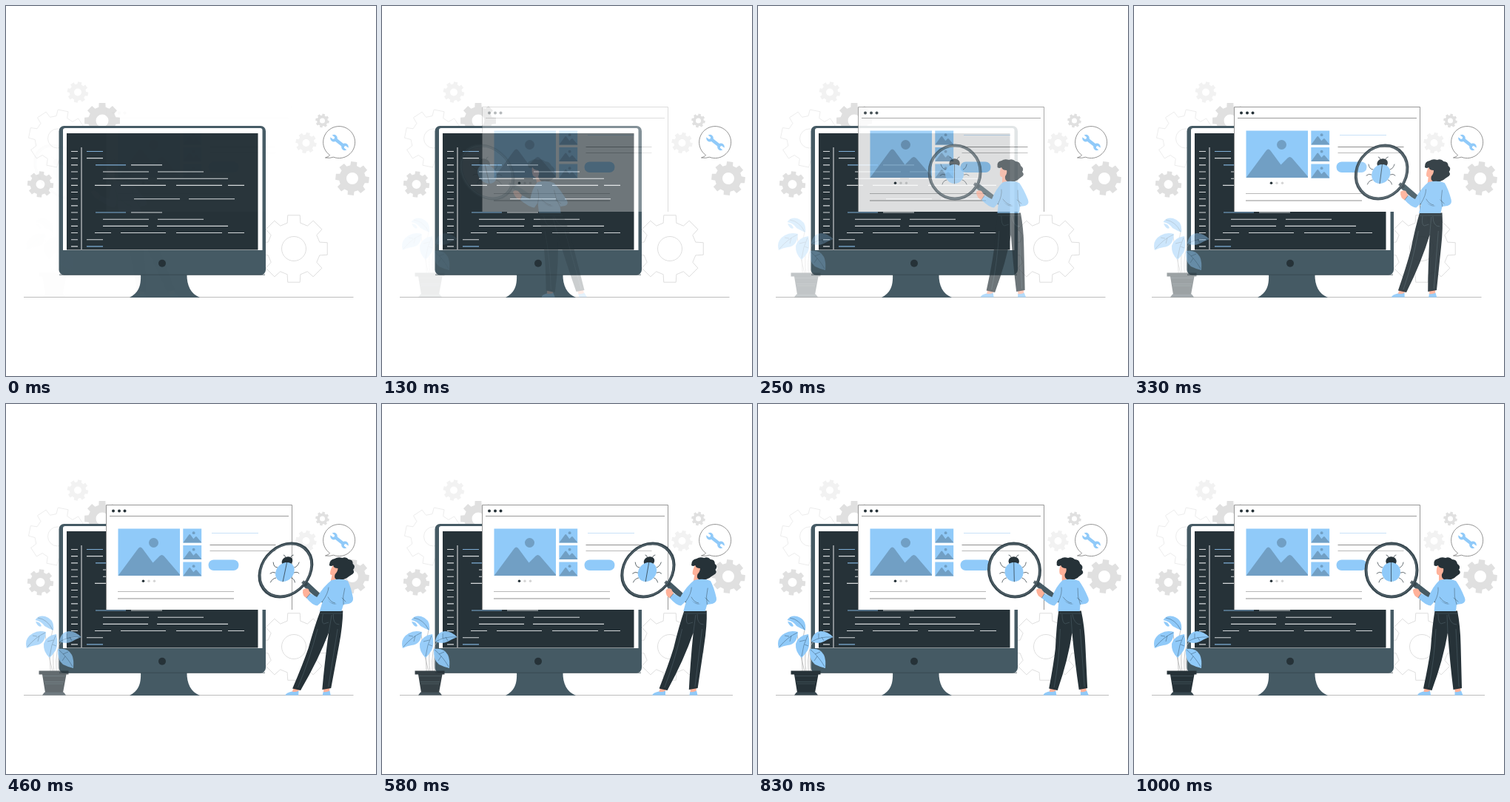
Write an HTML page that moves like this. It is 500 px wide and 500 px high and loops after 1.04 s.

```html
<!DOCTYPE html>
<html>
<head>
<meta charset="utf-8">
<style>
  html, body { margin: 0; width: 100%; height: 100%; overflow: hidden; background: #fff; }
  svg { display: block; width: 100vw; height: 100vh; }
  .blue { fill: #90caf9; }
  .dark { fill: #263238; }
  .slate { fill: #455a64; }
  .skin { fill: #ffb199; }
  .line { fill: none; stroke: #263238; stroke-width: .7; stroke-linecap: round; stroke-linejoin: round; }
  .vein { fill: none; stroke: #456b88; stroke-width: .6; }
  .fold { fill: none; stroke: #53666e; stroke-width: .5; }
</style>
</head>
<body>
<svg viewBox="0 0 500 500">
  <defs>
    <g id="photo">
      <path class="blue" d="M0 0H83.5V63.5H0Z"/>
      <path fill="#719fc4" d="M0 63.5L27 27Q30 23 33 27L47 46L56 37Q59 34 62 37L83.5 62V63.5Z"/>
      <circle cx="48" cy="19" r="6.5" fill="#719fc4"/>
    </g>
  </defs>

  <g id="gears"></g>
  <path id="floor" fill="none" stroke="#bdbdbd"/>

  <g id="bubble">
    <path d="M437.5 201.5Q436 204 431.5 205Q438 206 442.5 204.2A21.5 21.5 0 1 0 437.5 201.5Z" fill="#fff" stroke="#777" stroke-width=".8"/>
    <g transform="translate(450.5 184.5) rotate(38)">
      <path class="blue" d="M-8 -2.2H8V2.2H-8Z"/>
      <circle class="blue" cx="-9.5" r="4.8"/>
      <circle class="blue" cx="9.5" r="4.8"/>
      <path fill="#fff" d="M-15 -1.8H-9.5L-8.5 0L-9.5 1.8H-15ZM15 -1.8H9.5L8.5 0L9.5 1.8H15Z"/>
    </g>
  </g>

  <g id="monitor">
    <path class="slate" d="M182 362C183 380 178 388 167 394H262C250 389 244 378 244.500 362Z"/>
    <rect class="slate" x="71.500" y="162" width="279.500" height="201.500" rx="7"/>
    <path fill="#fff" d="M77 330V168Q77 165 80 165H343.500Q346.500 165 346.500 168V330Z"/>
    <path class="dark" d="M82 172H340.500V329.500H82Z"/>
    <path stroke="#37474f" stroke-width=".8" d="M72 363.200H350"/>
    <circle class="dark" cx="211" cy="347.800" r="5"/>
    <path id="code" fill="none" stroke="#d5d9db" stroke-width="1.100"/>
    <path id="keywords" fill="none" stroke="#7faed6" stroke-width="1.100"/>
  </g>

  <g id="page">
    <path fill="#fff" d="M135.500 136.500H386.500V278H135.500Z"/>
    <path fill="none" stroke="#8c8c8c" stroke-width=".9" d="M135.500 278V136.500H386.500V278"/>
    <path stroke="#9a9a9a" d="M140 151.500H382"/>
    <g class="dark">
      <circle cx="145" cy="144.400" r="2"/>
      <circle cx="153" cy="144.400" r="2"/>
      <circle cx="160.500" cy="144.400" r="2"/>
      <circle cx="185.500" cy="239.300" r="1.800"/>
    </g>
    <circle cx="193" cy="239.300" r="1.700" fill="#d5d5d5"/>
    <circle cx="200.500" cy="239.300" r="1.700" fill="#d5d5d5"/>
    <use href="#photo" x="151.500" y="168.500"/>
    <g id="thumbs"></g>
    <path stroke="#c9e2f8" d="M278 174.500H341"/>
    <path stroke="#8f8f8f" d="M275.500 190.500H364.500M151 263H308"/>
    <path stroke="#b8b8b8" d="M275.500 198.500H364.500M151 253.500H308"/>
    <rect class="blue" x="273.500" y="210.500" width="41" height="14.500" rx="7.200"/>
  </g>

  <g id="plant">
    <path fill="none" stroke="#b5b5b5" stroke-width=".8" d="M60 361Q58 325 63 305M63 361Q56 338 53 312M65 361Q62 348 66 316M68 361Q66 330 76 319M71 361Q69 346 72 333"/>
    <g class="blue">
      <path d="M39.500 292Q44 285 53 287Q66 291 64 306Q57 303 52 300Q47 293 39.500 292Z"/>
      <path d="M40 294Q46 294 48 300Q44 303 40 294Z"/>
      <path d="M54 308Q53 325 40 326Q33 327 28 330Q24 317 36 310Q44 305 54 308Z"/>
      <path d="M68 311Q71 325 67 333Q63 339 59 343Q50 335 51 324Q54 313 68 311Z"/>
      <path d="M72 321Q74 308 85 307Q94 307 101.500 315Q94 318 89 321Q81 325 72 321Z"/>
      <path d="M70 331Q84 329 89 339Q92 345 91 357Q83 355 77 352Q69 346 70 331Z"/>
    </g>
    <path class="vein" d="M43 289Q56 291 63 305M53 309Q40 315 29 328M42 314L36 313M45 313L43 321M67 313Q61 325 59 341M64 319L56 321M63 325L68 327M73 321Q84 314 100 315M82 317L82 310M86 315L89 320M71 332Q82 341 90 355M77 338L84 335M80 341L76 347"/>
    <path class="dark" d="M44.500 360.500H84.500V365.500H81.500L77 390H53L49 365.500H44.500Z"/>
    <path fill="#37474f" d="M52 389.500H78L81 393.500H49Z"/>
    <path class="fold" d="M50 367.500H80M52 375.500H78M53 378H77"/>
  </g>

  <g id="woman">
    <g id="shoes">
      <path fill="#ffb199" d="M393 383H401L399 390H391ZM433 383H441L442 390H434Z"/>
      <path class="blue" d="M383 393.500Q384 390 391 388.500Q396 390 400 387.500L401 393.500ZM433.500 393.500V389Q438 390 442 387.500L444.500 393.500Z"/>
    </g>
    <path class="dark" d="M406.500 279.500H437Q441 300 441.500 325L443 384L431.500 386Q427 350 424 309Q418 345 402.500 387L391 384.500Q398 352 401 330Q403 300 406.500 279.500Z"/>
    <path class="fold" d="M406.500 283H437.500M411 284Q411 296 415 297L421 295M425 284Q427 298 436 298M424 309L423 285M408 304Q406 345 398 383M435 304Q437 345 439 382"/>
    <path class="skin" d="M412 230L422 229L424 240H412Z"/>
    <path class="skin" d="M411 217Q408 223 409 229Q410 232 415 231L421 229L420 216Z"/>
    <path class="dark" d="M405.500 218Q404 210 411 209Q415 206 421 208Q426 206 430 210Q436 210 437 216Q442 219 439 224Q443 228 438 231Q435 233 433 235Q427 239 419 237Q415 235 416 230Q419 226 418 222Q412 222 411 218Q408 220 405.500 218Z"/>
    <path class="slate" d="M380 239.500L409.500 262.500Q411.500 267 406.500 268.500L376 246Z"/>
    <path class="skin" d="M377 251Q380 248 384 250L388 256L386 263Q377 260 377 251Z"/>
    <path class="blue" d="M413 238Q425 235 435 239Q441 247 447 262Q449 268 443 270L436 271L435 280H405.500L407 266L401 272.500Q394 272 384 262L388 256L398 261Q404 246 413 238Z"/>
    <path class="line" stroke-opacity=".55" d="M407 266Q412 256 411 248M436 271Q432 260 433 249M424 269Q418 268 413 261M438 267L432 262M388 256L384 262"/>
    <path fill="#719fc4" d="M412 262Q417 270 427 270Q419 273 412 262Z"/>
    <path stroke="#37474f" stroke-width="4" d="M374 240L381 245"/>
    <ellipse cx="348" cy="224.500" rx="34.500" ry="36" fill="#fff" fill-opacity=".18" stroke="#37474f" stroke-width="4"/>
    <ellipse cx="348" cy="224.500" rx="34" ry="35.500" fill="none" stroke="#75858d" stroke-width=".6"/>
    <g id="bug">
      <path class="line" d="M336 221Q331 221 329 214M359 221Q363 220 364 214M335 228Q331 226 328 229M360 228Q364 226 367 229M337 235Q332 236 331 241M358 235Q362 236 364 241M344 207Q343 204 341 204M351 207Q352 204 354 204"/>
      <ellipse class="dark" cx="347.500" cy="212.500" rx="7.200" ry="6.300"/>
      <ellipse class="blue" cx="347.500" cy="227" rx="12.500" ry="13"/>
      <path class="line" d="M347.500 214V240"/>
    </g>
  </g>
</svg>
<script>
const el = id => document.getElementById(id);
const mix = (a, b, p) => a + (b - a) * p;

// x, y, radius, hole radius, colour, rotation, outlined
const gears = [
  [97, 116.5, 14.3, 5, '#f2f2f2', .2],
  [130, 155, 24.3, 8.500, '#e0e0e0', 0],
  [69.5, 179, 39, 13, '#e8e8e8', .2, true],
  [46.5, 241, 17.8, 6, '#e0e0e0', .1],
  [427.5, 155, 9.400, 3.500, '#e0e0e0', .2],
  [405.5, 185, 14.3, 5, '#f2f2f2', .2],
  [468, 233, 23, 8, '#e0e0e0', .1],
  [389, 328, 46, 16.5, '#d6d6d6', 0, true]
];

function gearPath(x, y, r, hole, turn) {
  const points = [];
  for (let i = 0; i < 8; i++)
    for (const [da, k] of [[-.25, .78], [-.18, 1], [.18, 1], [.25, .78]]) {
      const a = turn + i * Math.PI / 4 + da;
      points.push([x + r * k * Math.cos(a), y + r * k * Math.sin(a)]);
    }
  return `M${points.join('L')}ZM${x - hole} ${y}a${hole} ${hole} 0 1 0 ${2 * hole} 0a${hole} ${hole} 0 1 0 ${-2 * hole} 0Z`;
}

el('gears').innerHTML = gears.map(([x, y, r, hole, colour, turn, outlined]) =>
  `<path d="${gearPath(x, y, r, hole, turn)}" fill-rule="evenodd" stroke-width=".8" stroke-linejoin="round"
    ${outlined ? `fill="none" stroke="${colour}"` : `fill="${colour}"`}/>`).join('');

el('thumbs').innerHTML = [168.5, 191, 213.5].map(y =>
  `<use href="#photo" transform="translate(239.300 ${y}) scale(.298)"/>`).join('');

// Code rows: row number, then start and end of each dash
const rowY = row => 196.5 + row * 9.17;
const dashes = rows => rows.map(([row, ...xs]) =>
  xs.map(([a, b]) => `M${a} ${rowY(row)}H${b}`).join('')).join('');
const block = first => [
  [first, [169, 211]],
  [first + 1, [131, 193], [205, 267]],
  [first + 2, [131, 192], [204, 300]],
  [first + 3, [120, 142], [155, 216], [230, 292], [300, 322]]
];
const lineNumbers = Array.from({ length: 15 }, (_, row) => [row, [88, 97]]);
el('code').setAttribute('d', 'M102 191V329' + dashes([
  ...lineNumbers, [1, [109, 131]], ...block(2),
  [7, [173, 235], [247, 309]], ...block(9), [13, [109, 131]]
]));
el('keywords').setAttribute('d', dashes([
  [0, [109, 131]], [2, [121, 162]], [9, [121, 162]], [14, [109, 131]]
]));

// cubic-bezier(.36, -.01, .5, 1.38)
function ease(x) {
  if (x <= 0) return 0;
  if (x >= 1) return 1;
  const curve = (s, a, b) => 3 * (1 - s) * s * ((1 - s) * a + s * b) + s ** 3;
  let lo = 0, hi = 1;
  for (let i = 0; i < 24; i++) {
    const mid = (lo + hi) / 2;
    if (curve(mid, .36, .5) < x) lo = mid; else hi = mid;
  }
  return curve(lo, -.01, 1.38);
}

// time, shift, skew in degrees, opacity
const entrance = [[0, -250, 20, 0], [600, 0, -10, 1], [800, 0, 2, 1], [1000, 0, 0, 1]];

function moveWoman(time) {
  const t = Math.min(time, 1000);
  const i = entrance.findIndex((key, n) => n && t <= key[0]);
  const from = entrance[i - 1], to = entrance[i];
  const p = ease((t - from[0]) / (to[0] - from[0]));
  const [, shift, skew, opacity] = from.map((v, n) => mix(v, to[n], p));
  const k = Math.tan(skew * Math.PI / 180);
  el('woman').setAttribute('transform', `matrix(1 0 ${k} 1 ${shift - 290 * k} 0)`);
  fade('woman', opacity);
}

function fade(id, opacity) {
  el(id).setAttribute('opacity', Math.max(0, Math.min(1, opacity)));
}

const LOOP = 1040, STEPS = 25;
function draw(now) {
  // The motion advances in 25 even steps per loop
  const step = Math.min(STEPS - 1, Math.floor((now % LOOP + 4) / (LOOP / STEPS)));
  const time = step * 1000 / (STEPS - 1) + 28;
  moveWoman(time);
  fade('page', ease(time / 500));
  fade('plant', ease(time / 1000));
  el('floor').setAttribute('d', `M24 393.500H${step < 14 ? 469.5 : 474}`);
}

let start;
function tick(now) {
  start ??= now;
  draw(now - start);
  requestAnimationFrame(tick);
}
draw(0);
requestAnimationFrame(tick);
</script>
</body>
</html>
```
